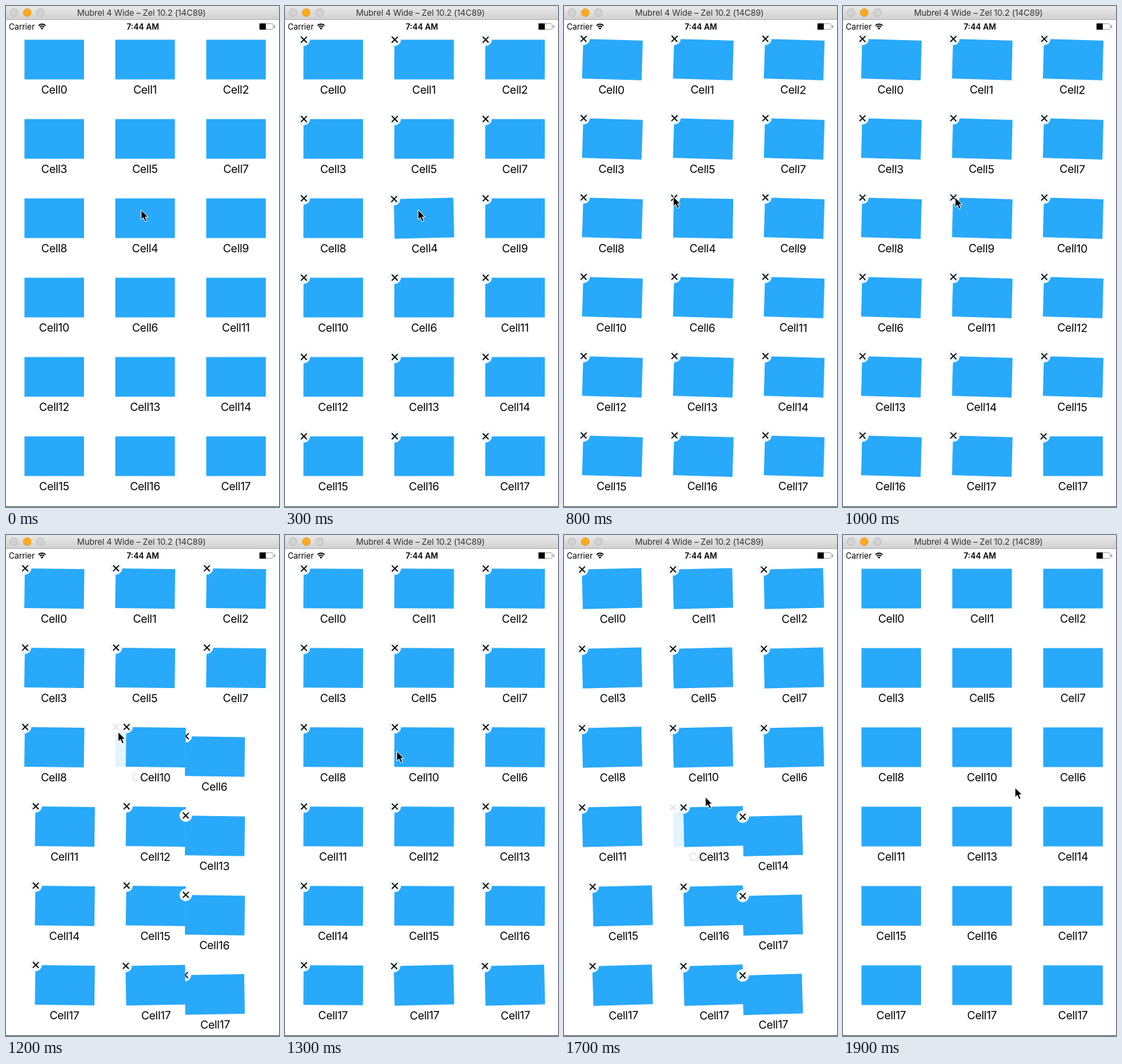
An HTML page for the animation above (2000 ms loop, 392 by 720 pixels).

```html
<!DOCTYPE html>
<html lang="en">
<head>
<meta charset="utf-8">
<title>Wiggling grid</title>
<style>
  html, body { margin: 0; width: 100%; height: 100%; overflow: hidden; background: #fff; }
  svg { display: block; width: 392px; height: 720px; font-family: Inter, sans-serif; }
  text { text-anchor: middle; }
  .tile { fill: #28a9fa; }
  .label { font-size: 16px; letter-spacing: -.3px; }
  .badge circle { fill: #f2f7f8; }
  .badge path { stroke: #000; stroke-width: 1.6; }
</style>
</head>
<body>
<svg viewBox="0 0 392 720">
  <defs>
    <linearGradient id="bar" x2="0" y2="1">
      <stop stop-color="#e9e9e9"/><stop offset="1" stop-color="#d0d0d0"/>
    </linearGradient>
  </defs>
  <rect width="392" height="720" fill="#fff"/>
  <g id="grid"></g>

  <rect width="392" height="20" fill="url(#bar)"/>
  <rect y="19" width="392" height="1" fill="#b4b4b4"/>
  <g fill="#d2d2d2" stroke="#b8b8b8">
    <circle cx="11.5" cy="9.5" r="5.5"/>
    <circle cx="30.5" cy="9.5" r="5.5" fill="#ffab1c" stroke="#e5951a"/>
    <circle cx="49.5" cy="9.5" r="5.5"/>
  </g>
  <text x="194.5" y="14" font-size="12" letter-spacing="-.1" fill="#333">Mubrel 4 Wide – Zel 10.2 (14C89)</text>

  <text x="4" y="34" font-size="11.4" style="text-anchor:start">Carrier</text>
  <g fill="none" stroke="#000" stroke-width="1.6">
    <path d="M46.6 28.2a7.3 7.3 0 0 1 10.2 0M48.6 30.4a4.5 4.5 0 0 1 6.2 0"/>
    <path d="M51.7 34l-1.9-2a2.8 2.8 0 0 1 3.8 0z" fill="#000" stroke="none"/>
  </g>
  <text x="196.5" y="34" font-size="11.4" font-weight="600">7:44 AM</text>
  <rect x="364.5" y="25.5" width="19" height="8" rx="1" fill="#fff" stroke="#aaa"/>
  <rect x="364" y="25" width="9" height="9"/>
  <rect x="385" y="28" width="1.3" height="3.5" fill="#777"/>
  <rect y="719" width="392" height="1" fill="#4c6464"/>

  <path id="cursor" d="M0 0V14.2L3.3 11.1L5.8 16.8L8.4 15.7L6 10.2H10.2Z" stroke="#fff"/>
</svg>
<script>
const LOOP = 2000, STEP = 100;
const EDIT_START = 200, EDIT_END = 1900;
const SLIDE = 127, SWAY = 1.78, SWAY_PERIOD = 2200;
const PRESSED = 7, VISIBLE = 18;

const removals = [{ at: 800, slot: 7 }, { at: 1100, slot: 7 }, { at: 1600, slot: 10 }];
const stops = [
  { t: 0, x: 194, y: 293 }, { t: 300, x: 191, y: 293 }, { t: 600, x: 153, y: 273 },
  { t: 1000, x: 161, y: 275 }, { t: 1200, x: 161, y: 283 },
  { t: 1500, x: 159, y: 390 }, { t: 1900, x: 247, y: 363 }
];

const clamp = v => Math.min(1, Math.max(0, v));
const ease = p => p * p * (3 - 2 * p);
const mix = (a, b, p) => a + (b - a) * p;
const slotPoint = slot => ({ x: 26.5 + slot % 3 * 130.5, y: 48.5 + Math.floor(slot / 3) * 114 });

const grid = document.getElementById('grid');
const cursor = document.getElementById('cursor');
const names = [0, 1, 2, 3, 5, 7, 8, 4, 9, 10, 6];
for (let n = 11; names.length < VISIBLE + removals.length; n++) names.push(Math.min(n, 17));

const cells = names.map((name, slot) => {
  const node = document.createElementNS('http://www.w3.org/2000/svg', 'g');
  node.innerHTML = `<rect class="tile" width="85.5" height="57"/>
    <text class="label" x="42.6" y="77.5">Cell${name}</text>
    <g class="badge"><circle cx=".5" cy="0" r="9"/><path d="M-3.7 -4.2l8.4 8.4m0 -8.4l-8.4 8.4"/></g>`;
  // One cell in nine passes beneath the others
  if (slot % 9 === 1) grid.prepend(node);
  else grid.append(node);
  return { node, slot, badge: node.querySelector('.badge') };
});

// Each removal fades one cell and moves every later cell back by one slot
function place(cell, t) {
  let slot = cell.slot;
  let { x, y } = slotPoint(slot);
  for (const removal of removals) {
    const p = ease(clamp((t - removal.at) / SLIDE));
    if (p === 0 || slot < removal.slot) continue;
    if (slot === removal.slot) return { x, y, alpha: 1 - p };
    const next = slotPoint(--slot);
    x = mix(x, next.x, p);
    y = mix(y, next.y, p);
  }
  return { x, y, alpha: 1 };
}

// The pressed cell and the cells from below sway out of step with the rest
function sway(slot, t) {
  const lag = slot === PRESSED ? 600 : slot >= VISIBLE ? -100 : 270;
  return SWAY * Math.sin((t - lag) / SWAY_PERIOD * 2 * Math.PI);
}

function pointer(t) {
  const i = stops.findIndex(stop => stop.t > t);
  if (i < 0) return stops.at(-1);
  const a = stops[i - 1], b = stops[i];
  const p = ease((t - a.t) / (b.t - a.t));
  return { x: mix(a.x, b.x, p), y: mix(a.y, b.y, p) };
}

function draw(t) {
  const editing = t >= EDIT_START && t < EDIT_END;
  for (const cell of cells) {
    const { x, y, alpha } = place(cell, t);
    const angle = editing ? sway(cell.slot, t) : 0;
    cell.node.setAttribute('transform', `translate(${x} ${y}) rotate(${angle} 42.8 38)`);
    cell.node.setAttribute('opacity', alpha);
    cell.badge.setAttribute('visibility', editing ? 'visible' : 'hidden');
  }
  const { x, y } = pointer(t);
  cursor.setAttribute('transform', `translate(${x} ${y})`);
}

const start = performance.now();
function tick() {
  const elapsed = (performance.now() - start) % LOOP;
  draw(Math.floor(elapsed / STEP) * STEP);
  requestAnimationFrame(tick);
}
tick();
</script>
</body>
</html>
```
